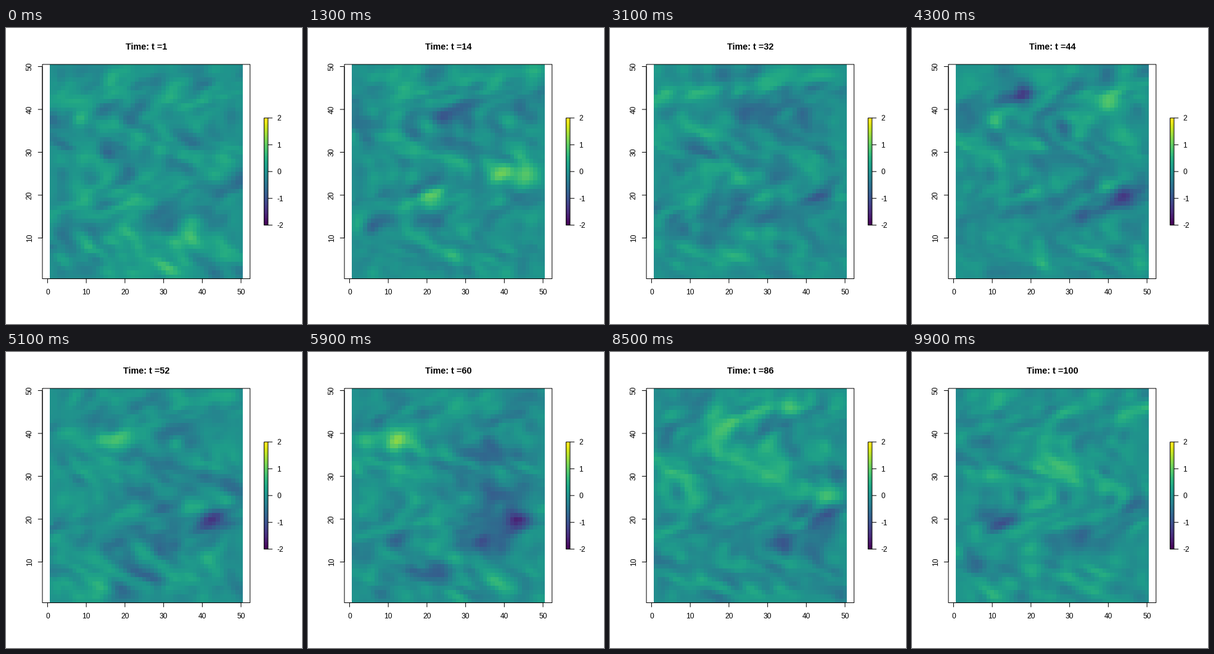
A matplotlib script that plays this animation: 480 by 480 pixels, repeating every 10 s.

```python
import numpy as np
import matplotlib.pyplot as plt
from matplotlib.animation import FuncAnimation

N, STEPS = 50, 100
PX = 0.75  # points per pixel at 96 dpi
plt.rcParams["font.family"] = "Liberation Sans"

cells = np.arange(1, N + 1)
X, Y = np.meshgrid(cells, cells)

# Long-lived patches: x, y, width, strength, time of peak, lifetime
PATCHES = [
    (43.3, 19.8, 2.6, -1.5, 60, 38),
    (33, 15, 5.5, -.75, 75, 38),
    (12, 18.8, 2.3, -1.4, 95, 16),
    (21, 19.5, 2.5, .95, 12, 10),
    (41, 26, 5, .7, 13, 9),
    (26, 40, 6, -.65, 22, 13),
    (18, 14, 7, -.4, 24, 16),
    (22, 5.5, 3, .85, 32, 7),
    (17.5, 43.3, 2.2, -1.2, 44, 7),
    (40, 42, 2.8, .95, 44, 7),
    (12.5, 38.5, 4.2, .9, 56, 14),
    (23, 8, 2.5, -1, 60, 8),
    (37.5, 6.3, 3.6, .8, 59, 9),
    (31, 24.5, 6, -.6, 61, 9),
    (33, 35.3, 4.5, -.7, 60, 8),
    (8, 30.5, 2.6, .9, 89, 13),
    (26, 32.3, 4.5, .65, 91, 15),
    (19, 41, 3, .75, 86, 7),
    (38, 46.3, 3, .75, 86, 7),
]


def flow(y):
    """Horizontal shear flow, still at four heights."""
    return np.cos(2 * np.pi * y / 25)


def patches(t):
    """Sheared Gaussian patches that swell and fade."""
    total = np.zeros((N, N))
    for x, y, w, a, peak, life in PATCHES:
        dx = X - x - 0.8 * w * (flow(Y) - flow(y))
        r2 = (dx / w) ** 2 + ((Y - y) / (1.1 + 0.25 * w)) ** 2
        total += a * np.exp(-r2 / 2 - ((t - peak) / life) ** 2)
    return total


def smooth(z, side):
    for _ in range(2):
        p = np.pad(z, ((1, 1), (0, 0)))
        z = (side * (p[:-2] + p[2:]) + (1 - 2 * side) * p[1:-1]).T
    return z


def advance(z, rng):
    """One step of advection, diffusion, damping and random forcing."""
    moved = [np.interp(cells - 2 * flow(y), cells, row, left=0, right=0)
             for y, row in zip(cells, z)]
    kick = rng.standard_normal((N, N))
    for _ in range(3):
        kick = smooth(kick, 0.25)
    return 0.94 * smooth(np.array(moved), 0.05) + 0.1 * kick / kick.std()


def simulate(warmup=50):
    rng = np.random.default_rng(5)
    z, states = np.zeros((N, N)), []
    for t in range(1 - warmup, STEPS + 1):
        z = advance(z, rng)
        if t > 0:
            states.append(z + patches(t))
    return states


states = simulate()

fig = plt.figure(figsize=(5, 5), dpi=96, facecolor="white")
ax = fig.add_axes([0, 0, 1, 1])
ax.axis("off")

LEFT, RIGHT, TOP, BOTTOM = 59.04, 395.76, 59.04, 406.56
MID = (LEFT + RIGHT) / 2
UNIT_Y = (BOTTOM - TOP) / N
UNIT_X = UNIT_Y * np.cos(np.radians(25.5))


def to_x(v):
    return MID + (v - 25.5) * UNIT_X


def to_y(v):
    return BOTTOM - (v - 0.5) * UNIT_Y


def line(xs, ys):
    ax.plot(xs, ys, color="black", lw=PX, solid_capstyle="butt", snap=False, zorder=3)


def frame_box(x0, x1, y0, y1):
    line([x0, x1, x1, x0, x0], [y0, y0, y1, y1, y0])


def label(x, y, s, size=12, **kw):
    kw = {"ha": "center", "va": "baseline", "rotation_mode": "anchor", **kw}
    return ax.text(x, y, s, fontsize=size * PX, color="black", **kw)


def raster(xs, ys, z):
    return ax.pcolormesh(np.round(xs), np.round(ys), z, cmap="viridis", vmin=-2, vmax=2,
                         antialiased=False, linewidth=0)


edges = np.arange(N + 1) + 0.5
heat = raster(to_x(edges), to_y(edges), states[0])
frame_box(LEFT, RIGHT, TOP, BOTTOM)
line([to_x(0), to_x(50)], [BOTTOM, BOTTOM])
line([LEFT, LEFT], [to_y(10), to_y(50)])

for v in range(0, 51, 10):
    x, y = to_x(v), to_y(v)
    line([x, x], [BOTTOM, BOTTOM + 7.2])
    label(x, 432.2, v)
    if v:
        line([LEFT - 7.2, LEFT], [y, y])
        label(41.8, y, v, rotation=90)

BAR_L, BAR_R = 418.44, 424.92
bar_mid, bar_half = (TOP + BOTTOM) / 2, (BOTTOM - TOP) / 4
bar_y = np.linspace(bar_mid + bar_half, bar_mid - bar_half, 101)
raster([BAR_L, BAR_R], bar_y, np.linspace(-2, 2, 100)[:, None])
frame_box(BAR_L, BAR_R, bar_y[-1], bar_y[0])
for v in range(-2, 3):
    y = bar_mid - v * bar_half / 2
    line([BAR_R, BAR_R + 7.2], [y, y])
    label(BAR_R + 14.4, y + 4.3, v, ha="left")

title = label(MID, 34.8, "", size=14.4, weight="bold")
ax.set_xlim(0, 480)
ax.set_ylim(480, 0)


def update(i):
    heat.set_array(states[i])
    title.set_text(f"Time: t ={i + 1}")
    return heat, title


anim = FuncAnimation(fig, update, frames=STEPS, interval=100, repeat=True, repeat_delay=0)
plt.show()
```
